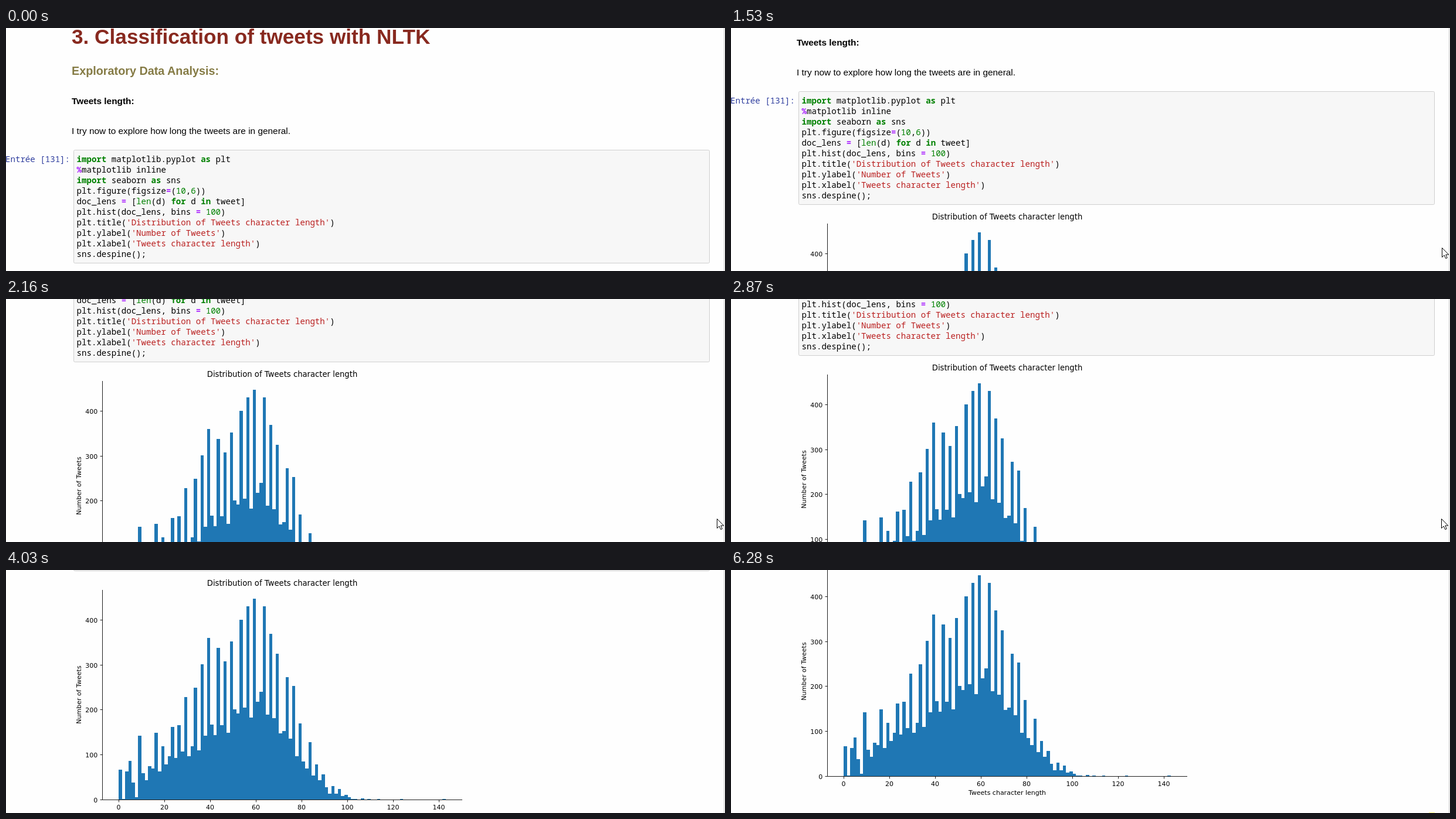
Animation, 1226 px wide and 415 px high, one loop 6450 ms. Source, as an HTML page:

```html
<!DOCTYPE html>
<html lang="en">
<head>
<meta charset="utf-8">
<title>Notebook scroll</title>
<style>
  html, body { margin: 0; width: 100%; height: 100%; overflow: hidden; background: #fefefe; }
  svg { display: block; width: 1226px; height: 415px; }
  text { white-space: pre; }
  .prose { font-family: "Liberation Sans", Arial, sans-serif; font-size: 15.4px; }
  .code { font-family: "Noto Sans Mono", monospace; font-size: 14.11px; }
  .plot { font-family: "DejaVu Sans", sans-serif; font-size: 11px; }
  .bold, .keyword, .operator { font-weight: bold; }
  .keyword, .builtin, .number { fill: #008000; }
  .operator { fill: #a2f; }
  .string { fill: #ba2121; }
</style>
</head>
<body>
<svg viewBox="0 0 1226 415">
  <g id="page">
    <g class="prose">
      <text class="bold" x="112" y="27" font-size="35.2" style="font-size:35.2px" fill="#88291f">3. Classification of tweets with NLTK</text>
      <text class="bold" x="112" y="80" style="font-size:19.8px" fill="#857b45">Exploratory Data Analysis:</text>
      <text class="bold" x="112" y="130">Tweets length:</text>
      <text x="112" y="181">I try now to explore how long the tweets are in general.</text>
    </g>
    <rect x="115.5" y="208.5" width="1084" height="193" rx="2" fill="#f7f7f7" stroke="#cfcfcf"/>
    <g class="code" id="code">
      <text x="-1" y="229" fill="#303f9f">Entrée [131]:</text>
    </g>
    <g class="plot" id="plot">
      <text x="471" y="427" text-anchor="middle" style="font-size:13.2px">Distribution of Tweets character length</text>
      <text x="471" y="824" text-anchor="middle">Tweets character length</text>
      <text transform="translate(128 613) rotate(-90)" text-anchor="middle">Number of Tweets</text>
    </g>
  </g>
  <rect x="1224" width="1" height="415" fill="#c6c6c6"/>
  <path id="pointer" d="M.5 .5V16.5L4.2 13L6.8 18.6L9.3 17.5L6.8 12H11.8Z" fill="#fff" stroke="#000"/>
  <rect id="glint" x="1190" y="414" width="10" height="1" fill="#ffff80"/>
</svg>
<script>
const LOOP = 6450;
const byId = id => document.getElementById(id);

function add(parent, tag, attributes, content = '') {
  const node = document.createElementNS('http://www.w3.org/2000/svg', tag);
  for (const name in attributes) node.setAttribute(name, attributes[name]);
  node.textContent = content;
  parent.appendChild(node);
  return node;
}

// Code cell
const source = `import matplotlib.pyplot as plt
%matplotlib inline
import seaborn as sns
plt.figure(figsize=(10,6))
doc_lens = [len(d) for d in tweet]
plt.hist(doc_lens, bins = 100)
plt.title('Distribution of Tweets character length')
plt.ylabel('Number of Tweets')
plt.xlabel('Tweets character length')
sns.despine();`;

const token = /(?<string>'[^']*')|(?<keyword>\b(?:import|as|for|in)\b)|(?<builtin>\blen\b)|(?<number>\b\d+\b)|(?<operator>[=%])|(?<plain>\w+|[^\w'])/g;

source.split('\n').forEach((line, row) => {
  const text = add(byId('code'), 'text', { x: 120.5, y: 229 + row * 18 });
  for (const match of line.matchAll(token)) {
    const kind = Object.keys(match.groups).find(name => match.groups[name]);
    add(text, 'tspan', { class: kind }, match[0]);
  }
});

// Histogram
const LEFT = 164, RIGHT = 778, TOP = 434, BASE = 792;
const xOf = value => 192 + value * 3.9;
const yOf = count => BASE - count * 0.768;
const counts = [
  66, 1, 63, 86, 38, 5, 142, 58, 43, 74, 69, 149, 63, 119, 78, 97, 162, 93, 165, 107,
  228, 97, 119, 249, 109, 301, 142, 360, 167, 143, 337, 166, 307, 149, 351, 200, 192, 400, 205, 430,
  182, 446, 218, 239, 430, 189, 369, 181, 324, 147, 152, 272, 136, 252, 97, 169, 85, 69, 128, 53,
  78, 43, 56, 27, 13, 30, 13, 23, 8, 10, 5, 1, 1, 0, 3, 0, 1
];
counts[79] = counts[86] = counts[99] = 1;

const plot = byId('plot');
const binEdge = bin => Math.round(192 + bin * 5.58);
counts.forEach((count, bin) => add(plot, 'rect', {
  x: binEdge(bin), width: binEdge(bin + 1) - binEdge(bin),
  y: Math.round(yOf(count)), height: BASE - Math.round(yOf(count)), fill: '#1f77b4'
}));

let axes = `M${LEFT}.5 ${TOP}V${BASE}.5H${RIGHT}`;
for (let count = 0; count <= 400; count += 100) {
  const y = Math.round(yOf(count));
  axes += `M${LEFT}.5 ${y + 0.5}h-4`;
  add(plot, 'text', { x: 156.3, y: y + 4.5, 'text-anchor': 'end' }, count);
}
for (let value = 0; value <= 140; value += 20) {
  const x = Math.round(xOf(value));
  axes += `M${x + 0.5} ${BASE}.5v4`;
  add(plot, 'text', { x, y: 809, 'text-anchor': 'middle' }, value);
}
add(plot, 'path', { d: axes, fill: 'none', stroke: '#000', 'stroke-width': 0.88 });

// Motion: each entry holds until the next one starts
const scroll = [
  [0, 0], [1380, 12], [1450, 62], [1530, 100],
  [1760, 123], [1840, 197], [1920, 245], [2000, 270], [2080, 284], [2150, 294], [2230, 300],
  [2870, 305], [2950, 350], [3020, 390], [3100, 400],
  [5040, 413], [5120, 433], [5200, 440]
];
const pointer = [
  [0, 1240, 384], [590, 1224, 384], [670, 1222, 383], [750, 1220, 381], [830, 1218, 379],
  [900, 1216, 377], [980, 1215, 375], [1060, 1214, 374], [1210, 1213, 375], [1290, 1212, 375],
  [2870, 1211, 375], [3800, 1212, 376], [3880, 1216, 377], [3950, 1221, 379], [4030, 1240, 380]
];
const stateAt = (steps, time) => steps.findLast(([start]) => start <= time);

const origin = performance.now();
function draw() {
  const time = Math.max(0, performance.now() - origin) % LOOP;
  const [, offset] = stateAt(scroll, time);
  const [, x, y] = stateAt(pointer, time);
  byId('page').setAttribute('transform', `translate(0 ${-offset})`);
  byId('pointer').setAttribute('transform', `translate(${x} ${y})`);
  byId('glint').setAttribute('opacity', time >= 6280 ? 1 : 0);
  requestAnimationFrame(draw);
}
draw();
</script>
</body>
</html>
```
